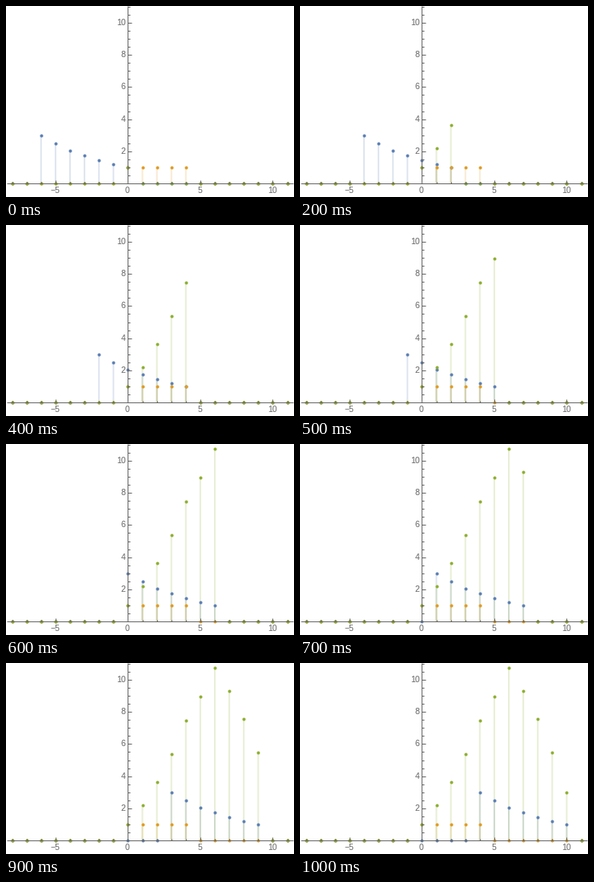
Recreate the animation shown at these times as a matplotlib script. Size 360 by 239 pixels, loop 1.1 s.

```python
import matplotlib.pyplot as plt
from matplotlib.animation import FuncAnimation
from matplotlib.patches import Rectangle

W, H, DPI = 360, 239, 100
PX = 72 / DPI                      # one pixel in points
X0, Y0, SX, SY = 152.4, 222.3, 18.1, 20.15
BLUE, ORANGE, GREEN, GREY = "#5e81b5", "#e19c24", "#8fb032", "#666666"

DOMAIN = range(-8, 12)
KERNEL = [1.2 ** k for k in range(7)]
BOX = 5
STEPS = len(KERNEL) + BOX - 1


def sx(x):
    return X0 + SX * x


def sy(y):
    return Y0 - SY * y


def kernel(k):
    return KERNEL[k] if 0 <= k < len(KERNEL) else 0


def box(x):
    return 1 if 0 <= x < BOX else 0


def conv(x):
    return sum(kernel(x - k) for k in range(BOX))


fig = plt.figure(figsize=(W / DPI, H / DPI), dpi=DPI, facecolor="white")
ax = fig.add_axes([0, 0, 1, 1])
ax.set_xlim(0, W)
ax.set_ylim(H, 0)
ax.axis("off")
plot_area = Rectangle((0, 0), W, Y0, transform=ax.transData)


def rule(xs, ys):
    ax.plot(xs, ys, color=GREY, lw=PX, solid_capstyle="butt", zorder=5)


def label(x, y, value, ha):
    ax.text(x, y, str(value).replace("-", "\u2212"), ha=ha, va="baseline",
            family="Liberation Sans", fontsize=10.5 * PX, color=GREY)


def draw_axes():
    rule([1, W - 1], [Y0, Y0])
    rule([X0, X0], [0, Y0])
    for x in DOMAIN:
        major = x % 5 == 0
        rule([sx(x)] * 2, [Y0, Y0 - (4 if major else 2.5)])
        if major:
            label(sx(x) - 0.5, 234, x, "center")
    for i in range(1, 23):
        y = i / 2
        major = i % 4 == 0
        rule([X0, X0 + (5 if major else 3)], [sy(y)] * 2)
        if major:
            label(149.5, sy(y) + 3, int(y), "right")


def stems(signal, color):
    """Filled stems and dots; the axes are painted over them."""
    ys = [signal(x) for x in DOMAIN]
    arts = []
    for x, y in zip(DOMAIN, ys):
        if x and y:
            arts += ax.plot([sx(x)] * 2, [Y0, sy(y)], color=color, alpha=0.2,
                            lw=2 * PX, solid_capstyle="butt", snap=False,
                            zorder=2)
    arts += ax.plot([sx(x) for x in DOMAIN], [sy(y) for y in ys], "o",
                    color=color, ms=4 * PX, mew=0, snap=False, zorder=3,
                    clip_path=plot_area)
    return arts


drawn = []


def update(n):
    while drawn:
        drawn.pop().remove()
    drawn.extend(stems(lambda x: kernel(n - x), BLUE))
    drawn.extend(stems(box, ORANGE))
    drawn.extend(stems(lambda x: conv(x) if x <= n else 0, GREEN))
    return drawn


draw_axes()
anim = FuncAnimation(fig, update, frames=STEPS, init_func=lambda: [],
                     interval=100, repeat=True, repeat_delay=0)
plt.show()
```
